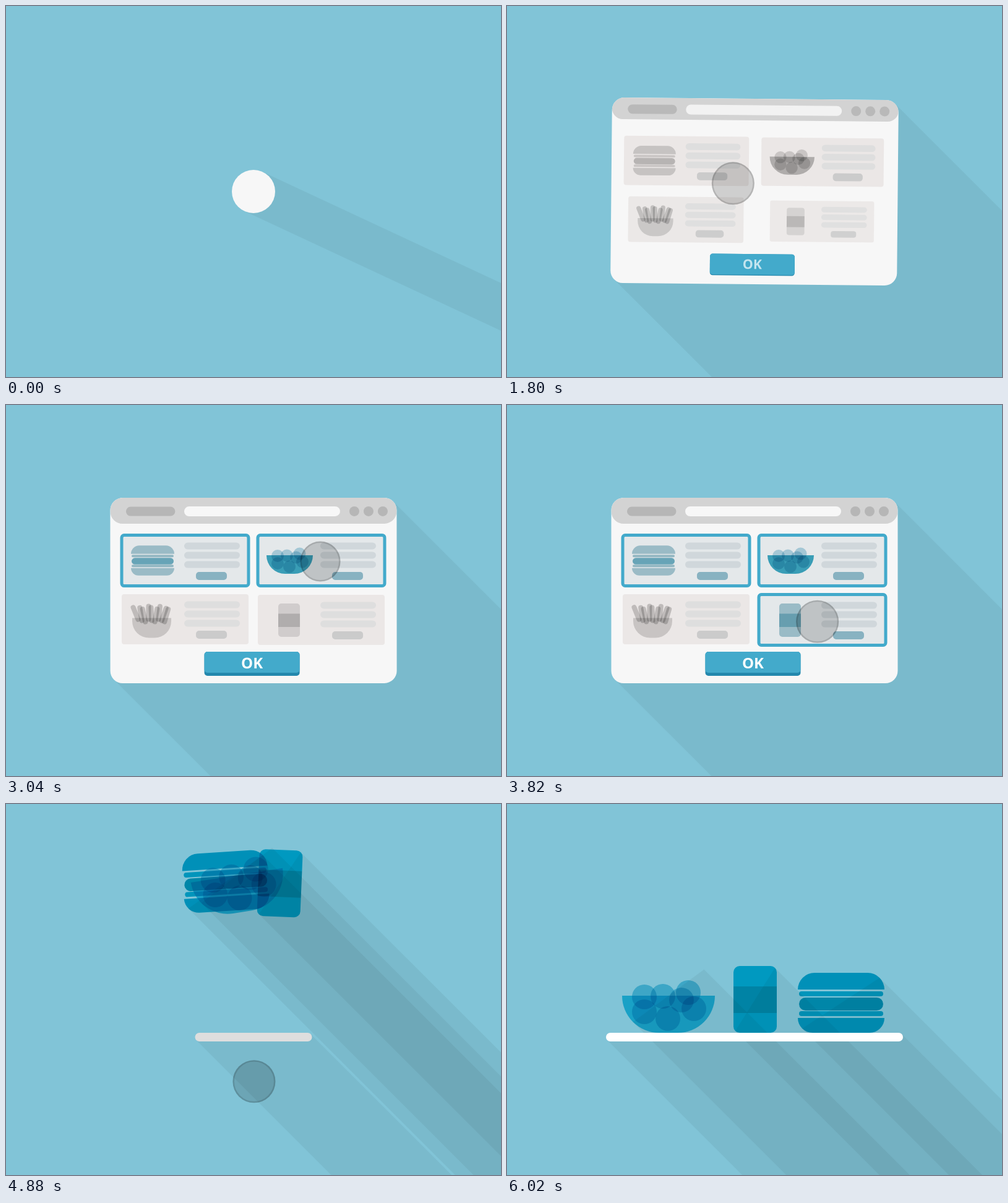
Write an HTML page with a canvas that moves like this. It is 800x600 px and loops after 6760 ms.

```html
<!DOCTYPE html>
<html lang="en">
<head>
<meta charset="utf-8">
<title>Order flow</title>
<style>
html, body { margin: 0; width: 100%; height: 100%; overflow: hidden; background: #81c4d7; }
canvas { display: block; width: 800px; height: 600px; }
</style>
</head>
<body>
<canvas id="stage" width="800" height="600"></canvas>
<script>
const ctx = document.getElementById('stage').getContext('2d');
const LOOP = 6760;
const FREE = 4240; // the chosen items leave their cards
const RAD = Math.PI / 180;

// --- easing and maths
const clamp = v => Math.max(0, Math.min(1, v));
const seg = (t, a, b) => clamp((t - a) / (b - a));
const lerp = (a, b, k) => a + (b - a) * k;
const mix = (a, b, k) => a.map((v, i) => lerp(v, b[i], k));
const quad = u => u < .5 ? 2 * u * u : 1 - 2 * (1 - u) * (1 - u);
const cubicOut = u => 1 - (1 - u) ** 3;
const sine = u => (1 - Math.cos(Math.PI * u)) / 2;
const rgb = c => `rgb(${c.map(Math.round).join()})`;

// --- drawing helpers
function box(x, y, w, h, r, fill) {
  ctx.beginPath();
  ctx.roundRect(x, y, w, h, r);
  ctx.fillStyle = fill;
  ctx.fill();
}

function disc(x, y, r, fill) {
  ctx.beginPath();
  ctx.arc(x, y, r, 0, 7);
  ctx.fillStyle = fill;
  ctx.fill();
}

function place(x, y, rot, scale, draw) {
  ctx.save();
  ctx.translate(x, y);
  ctx.rotate(rot * RAD);
  ctx.scale(scale, scale);
  draw();
  ctx.restore();
}

// Long shadow of a convex shape given as circles [x, y, r]
function shadow(circles, pose, angle, alpha) {
  const a = angle * RAD, c = Math.cos(a), s = Math.sin(a);
  const rc = Math.cos(pose.rot * RAD) * pose.scale, rs = Math.sin(pose.rot * RAD) * pose.scale;
  let lo = null, hi = null;
  for (const [px, py, pr] of circles) {
    const x = pose.x + px * rc - py * rs, y = pose.y + px * rs + py * rc, r = pr * pose.scale;
    const d = y * c - x * s;
    if (!hi || d + r > hi.d) hi = { d: d + r, x: x - s * r, y: y + c * r };
    if (!lo || d - r < lo.d) lo = { d: d - r, x: x + s * r, y: y - c * r };
  }
  ctx.beginPath();
  ctx.moveTo(lo.x, lo.y);
  ctx.lineTo(lo.x + 1200 * c, lo.y + 1200 * s);
  ctx.lineTo(hi.x + 1200 * c, hi.y + 1200 * s);
  ctx.lineTo(hi.x, hi.y);
  ctx.fillStyle = `rgba(0,0,0,${alpha})`;
  ctx.fill();
}

const corners = (w, h, r) => [[-1, -1], [1, -1], [1, 1], [-1, 1]]
  .map(([i, j]) => [i * (w / 2 - r), j * (h / 2 - r), r]);

// --- items: each tint is [plain, chosen, served], multiplied onto the ground
const grey = v => [v, v, v];
const TINT = {
  bun: [grey(214), [172, 206, 216], [0, 188, 218]],
  strip: [grey(218), [165, 201, 212], [0, 194, 222]],
  patty: [grey(198), [115, 180, 200], [0, 174, 200]],
  bowl: [grey(188), [64, 173, 199], [48, 209, 235]],
  ball: [grey(217), [184, 219, 232], [120, 216, 235]],
  can: [grey(226), [172, 206, 216], [0, 199, 228]],
  band: [grey(216), [170, 216, 225], [255, 219, 219]]
};
const BALLS = [[-39, -18], [-9, -19], [32, -25], [21, -13], [-39, 6], [-1, 17], [41, 1]];

function tint(name, k) {
  const [a, b, c] = TINT[name];
  return rgb(k < 1 ? mix(a, b, k) : mix(b, c, k - 1));
}

function burger(k) {
  box(-70, -48.5, 140, 27, [27, 27, 0, 0], tint('bun', k));
  box(-68, -18.5, 136, 8, 4, tint('strip', k));
  box(-68, -8.5, 136, 21, 10.5, tint('patty', k));
  box(-68, 13.5, 136, 8, 4, tint('strip', k));
  box(-70, 24.5, 140, 24, [0, 0, 24, 24], tint('bun', k));
}

function bowl(k) {
  box(-75, -20, 150, 60, [0, 0, 60, 60], tint('bowl', k));
  for (const [x, y] of BALLS) disc(x, y, 20, tint('ball', k));
}

function can(k) {
  box(-35, -54, 70, 108, 10, tint('can', k));
  box(-35, -21, 70, 43, 0, tint('band', k));
}

function fries() {
  for (let i = 0; i < 9; i++) {
    const lean = -18 + 4.8 * i + (i % 2 ? 4 : -4);
    place(-42 + 10.5 * i, 8, lean, 1, () => box(-8, -56 + i % 3 * 4, 16, 58, 8, '#cfcfcf'));
  }
  box(-63, -2, 126, 64, [0, 0, 54, 54], '#d9d9d9');
}

// from/to: resting places, peak: top of the toss, tilt: two leaning poses
const ITEMS = [
  { draw: burger, from: [237, 251.5], to: [540, 321.5], peak: 125, land: 5285, slide: 5690, grow: 727, tilt: [-18, 8.4],
    hull: [[-43, -21.5, 27], [43, -21.5, 27], [-46, 24.5, 24], [46, 24.5, 24]] },
  { draw: bowl, from: [458.5, 253], to: [261, 330], peak: 135, land: 5255, slide: 5640, grow: 517, tilt: [-11, -7],
    hull: [[-75, -20, 0], [75, -20, 0], [-15, -20, 60], [15, -20, 60]].map(([x, y, r]) => r ? [x, y, r] : [x, y, 0]) },
  { draw: can, from: [457.5, 348], to: [401, 316], peak: 128, land: 5245, slide: 6000, grow: 510, tilt: [7, -1.5],
    hull: corners(70, 108, 10) }
];

function hop(t, start, len, height) {
  const u = seg(t, start, start + len);
  return height * 4 * u * (1 - u);
}

function itemPose(it, t) {
  const top = 4894, [x0, y0] = it.from, [x1, y1] = it.to, [r1, r2] = it.tilt;
  let y;
  if (t < top) y = lerp(y0, it.peak, sine(seg(t, FREE, top)));
  else y = lerp(it.peak, y1, seg(t, top, it.land) ** 2);
  y -= hop(t, it.land, 280, 14) + hop(t, it.land + 280, 180, 4);
  let rot;
  if (t < 4480) rot = r1 * sine(seg(t, FREE, 4480));
  else if (t < 5240) rot = lerp(r1, r2, sine(seg(t, 4480, 5240)));
  else rot = r2 * (1 - sine(seg(t, 5240, 5560)));
  return {
    x: lerp(x0, x1, quad(seg(t, FREE, it.slide))), y, rot,
    scale: lerp(.5, 1, quad(seg(t, FREE, FREE + it.grow)))
  };
}

// --- window
const CARDS = [
  { x: 187, y: 211, item: ITEMS[0], pick: 2190, born: 1423 },
  { x: 407, y: 211, item: ITEMS[1], pick: 2880, born: 1463 },
  { x: 187, y: 306, born: 1524 },
  { x: 407, y: 307, item: ITEMS[2], pick: 3540, born: 1582 }
];

function drawCard(c, t) {
  const p = cubicOut(seg(t, c.born, c.born + 500));
  if (!p) return;
  const k = c.pick ? sine(seg(t, c.pick, c.pick + 150)) : 0;
  const shade = (a, b) => rgb(mix(a, b, k));
  const cx = c.x + 102.5, cy = c.y + 40.5;
  ctx.globalAlpha = p;
  place(cx - 400, cy - 300, 0, p, () => {
    box(-102.5, -40.5, 205, 81, 4, shade([235, 231, 230], [228, 232, 234]));
    if (k) {
      ctx.strokeStyle = '#43aacb';
      ctx.lineWidth = 5 * k;
      ctx.beginPath();
      ctx.roundRect(-102.5, -41, 205, 82, 4);
      ctx.stroke();
    }
    for (let i = 0; i < 3; i++) box(-1.5, -29 + 15 * i, 90, 11, 5.5, shade(grey(222), [208, 215, 219]));
    box(17.5, 18.5, 50, 13, 5, shade(grey(203), [136, 178, 193]));
    ctx.globalCompositeOperation = 'multiply';
    if (!c.item) place(-54, -1, 0, .5, fries);
    else if (t < FREE) place(c.item.from[0] - cx, c.item.from[1] - cy, 0, .5, () => c.item.draw(k));
    ctx.globalCompositeOperation = 'source-over';
  });
  ctx.globalAlpha = 1;
}

function drawButton(t) {
  const p = cubicOut(seg(t, 1540, 2040));
  if (!p) return;
  const down = seg(t, 4110, 4190);
  place(-2.5, 118.5, 0, p, () => {
    box(-77, -19.5 + 4 * down, 154, 39 - 4 * down, 5, '#2488ad');
    box(-77, -19.5 + 4 * down, 154, lerp(39, 34, seg(t, 1700, 2100)), 5, '#43aacb');
    ctx.fillStyle = `rgba(255,255,255,${lerp(.3, 1, seg(t, 1600, 1960))})`;
    ctx.font = 'bold 24px "Open Sans", "Noto Sans", sans-serif';
    ctx.textAlign = 'center';
    ctx.textBaseline = 'alphabetic';
    ctx.fillText('OK', 0, 7.5 + 4 * down);
  });
}

function drawHeader(t, w, h) {
  const p = cubicOut(seg(t, 1380, 2310)), hh = 42 * p;
  if (!p) return;
  ctx.save();
  ctx.beginPath();
  ctx.roundRect(-w / 2, -h / 2, w, h, 20);
  ctx.clip();
  box(-w / 2, -h / 2, w, hh, Math.min(20, hh / 2), '#d3d3d3');
  const y = -h / 2 + hh / 2 + 1;
  ctx.globalAlpha = seg(t, 1450, 1850);
  box(-206, y - 7.5, 79.5, 15, 7.5, '#b6b6b6');
  box(-112, y - 8, 252, 16, 8, '#f7f7f7');
  for (let i = 0; i < 3; i++) disc(163 + 23 * i, y, 8, '#b6b6b6');
  ctx.restore();
}

function drawWindow(t) {
  const gone = seg(t, 4200, 4440);
  if (gone === 1) return;
  const g = cubicOut(seg(t, 1100, 1700));
  const w = lerp(70, 463, g), h = lerp(70, 300, g), r = lerp(35, 20, g);
  const dt = t - 1100;
  const rot = dt > 0 ? 5.07 * Math.exp(-dt / 410) * Math.sin(2 * Math.PI * dt / 500) : 0;
  const pose = { x: 400, y: 300, rot, scale: 1 - gone * gone };
  shadow(corners(w, h, r), pose, lerp(25, 45, g), .05);
  const press = seg(t, 900, 980) * (1 - seg(t, 1080, 1160));
  if (press) disc(400, 300 + 3 * press, 35, '#4f8c9d');
  place(400, 300, rot, pose.scale, () => {
    box(-w / 2, -h / 2, w, h, r, '#f7f7f7');
    drawHeader(t, w, h);
    for (const c of CARDS) drawCard(c, t);
    drawButton(t);
  });
}

// --- shelf and served items
function drawServed(t) {
  if (t < FREE) return;
  const poses = ITEMS.map(it => itemPose(it, t));
  const p = cubicOut(seg(t, 4673, 6020)), w = 480 * p;
  const dark = .05 * seg(t, FREE, 4440);
  if (p) shadow(corners(w, 14, Math.min(7, w / 2)), { x: 400, y: 377, rot: 0, scale: 1 }, 45, .05);
  ITEMS.forEach((it, i) => shadow(it.hull, poses[i], 45, dark));
  if (p) box(400 - w / 2, 370, w, 14, Math.min(7, w / 2), rgb(grey(lerp(200, 255, p))));
  const k = 1 + seg(t, FREE, 4627);
  ctx.globalCompositeOperation = 'multiply';
  ITEMS.forEach((it, i) => place(poses[i].x, poses[i].y, poses[i].rot, poses[i].scale, () => it.draw(k)));
  ctx.globalCompositeOperation = 'source-over';
}

// --- pointer: [start, end, x, y, sag]
const MOVES = [
  [1560, 2170, 288, 253, 0],
  [2310, 2870, 508, 253, 12],
  [3050, 3500, 508, 346, 0],
  [3760, 4110, 400, 420, 0],
  [4640, 5800, 411, 756, 0]
];
const PRESSES = [[900, 1080], [2170, 2290], [2870, 3060], [3500, 3680], [4110, 4520]];

function drawPointer(t) {
  if (t <= 440 || t > 5800) return;
  const u = seg(t, 430, 900);
  let x = lerp(476, 400, quad(u)), y = lerp(637, 302, cubicOut(u));
  for (const [a, b, mx, my, sag] of MOVES) {
    const k = quad(seg(t, a, b));
    x = lerp(x, mx, k);
    y = lerp(y, my, k) + sag * Math.sin(Math.PI * k);
  }
  let press = 0;
  for (const [a, b] of PRESSES) press = Math.max(press, seg(t, a, a + 80) * (1 - seg(t, b, b + 80)));
  const r = lerp(34.5, 32.5, press);
  disc(x, y, r, 'rgba(0,0,0,.16)');
  ctx.beginPath();
  ctx.arc(x, y, r - 1.25, 0, 7);
  ctx.lineWidth = 2.5;
  ctx.strokeStyle = 'rgba(0,0,0,.13)';
  ctx.stroke();
}

function frame(now) {
  const t = Math.floor(now % LOOP / 20) * 20;
  ctx.fillStyle = '#81c4d7';
  ctx.fillRect(0, 0, 800, 600);
  drawWindow(t);
  drawServed(t);
  drawPointer(t);
  requestAnimationFrame(frame);
}
requestAnimationFrame(frame);
</script>
</body>
</html>
```
